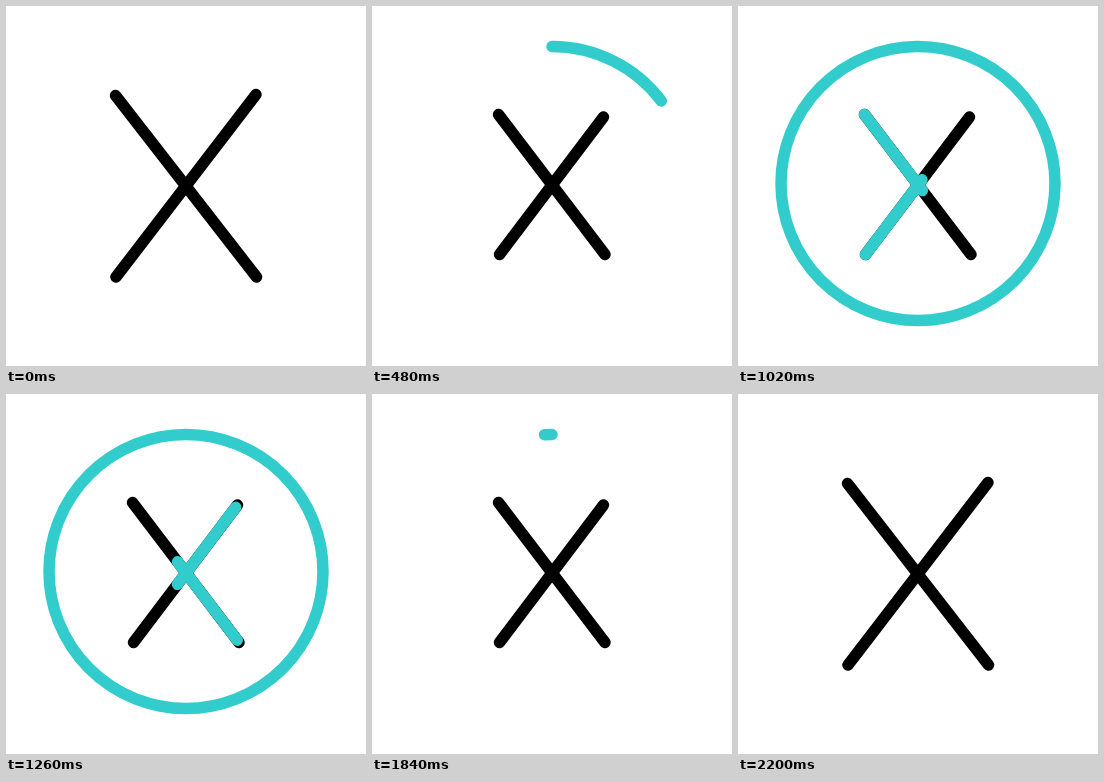
Write an HTML page without scripts that moves like this. It is 360 px wide and 360 px high and loops after 2.6 s.

```html
<!DOCTYPE html>
<html lang="en">
<head>
<meta charset="utf-8">
<title>Close button loader</title>
<style>
  html, body { margin: 0; width: 100%; height: 100%; overflow: hidden; background: #fff; }
  svg { display: block; width: 100vw; height: 100vh; }

  path {
    --out: cubic-bezier(.333, .667, .667, 1);
    --in: cubic-bezier(.333, 0, .667, .333);
    fill: none;
    stroke: #3cc;
    stroke-width: 11.5;
    stroke-linecap: round;
    animation: 2600ms linear infinite;
  }
  .bar { stroke: #000; }
  .down { animation-name: down; }
  .up { animation-name: up; }
  .dash { stroke-dasharray: 56 300; animation-name: dash; }
  .ring { stroke-dasharray: 360 400; animation-name: ring; }

  /* the cross shrinks, waits, then grows back */
  @keyframes down {
    0%, 3.46%, 84.42%, 100% { d: path("M109.5 89.5L250.5 271"); animation-timing-function: ease-in-out; }
    15.15%, 74.15% { d: path("M126.5 108.5L233 248.5"); animation-timing-function: ease-in-out; }
  }
  @keyframes up {
    0%, 3.46%, 84.42%, 100% { d: path("M110 271L250 88.5"); animation-timing-function: ease-in-out; }
    15.15%, 74.15% { d: path("M127.5 248.5L231.5 111"); animation-timing-function: ease-in-out; }
  }

  /* a teal dash runs along each bar */
  @keyframes dash {
    0% { stroke-dashoffset: 58; }
    25.38% { stroke-dashoffset: 58; animation-timing-function: cubic-bezier(.333, .257, .667, .6); }
    59.73%, 100% { stroke-dashoffset: -102; }
  }

  /* the ring draws itself, then erases clockwise */
  @keyframes ring {
    0% { stroke-dashoffset: 361; }
    15.15% { stroke-dashoffset: 361; animation-timing-function: var(--out); }
    40.58% { stroke-dashoffset: 0; }
    50.35% { stroke-dashoffset: 0; animation-timing-function: var(--in); }
    74.15%, 100% { stroke-dashoffset: -361; }
  }
</style>
</head>
<body>
<svg viewBox="0 0 360 360">
  <path class="ring" pathLength="360" d="M180 40.5a137 137 0 0 1 0 274a137 137 0 0 1 0 -274"/>
  <path class="bar down" d="M109.5 89.5L250.5 271"/>
  <path class="bar up" d="M110 271L250 88.5"/>
  <path class="dash" pathLength="100" d="M126.5 108.5L233 248.5"/>
  <path class="dash" pathLength="100" d="M127.5 248.5L231.5 111"/>
</svg>
</body>
</html>
```
